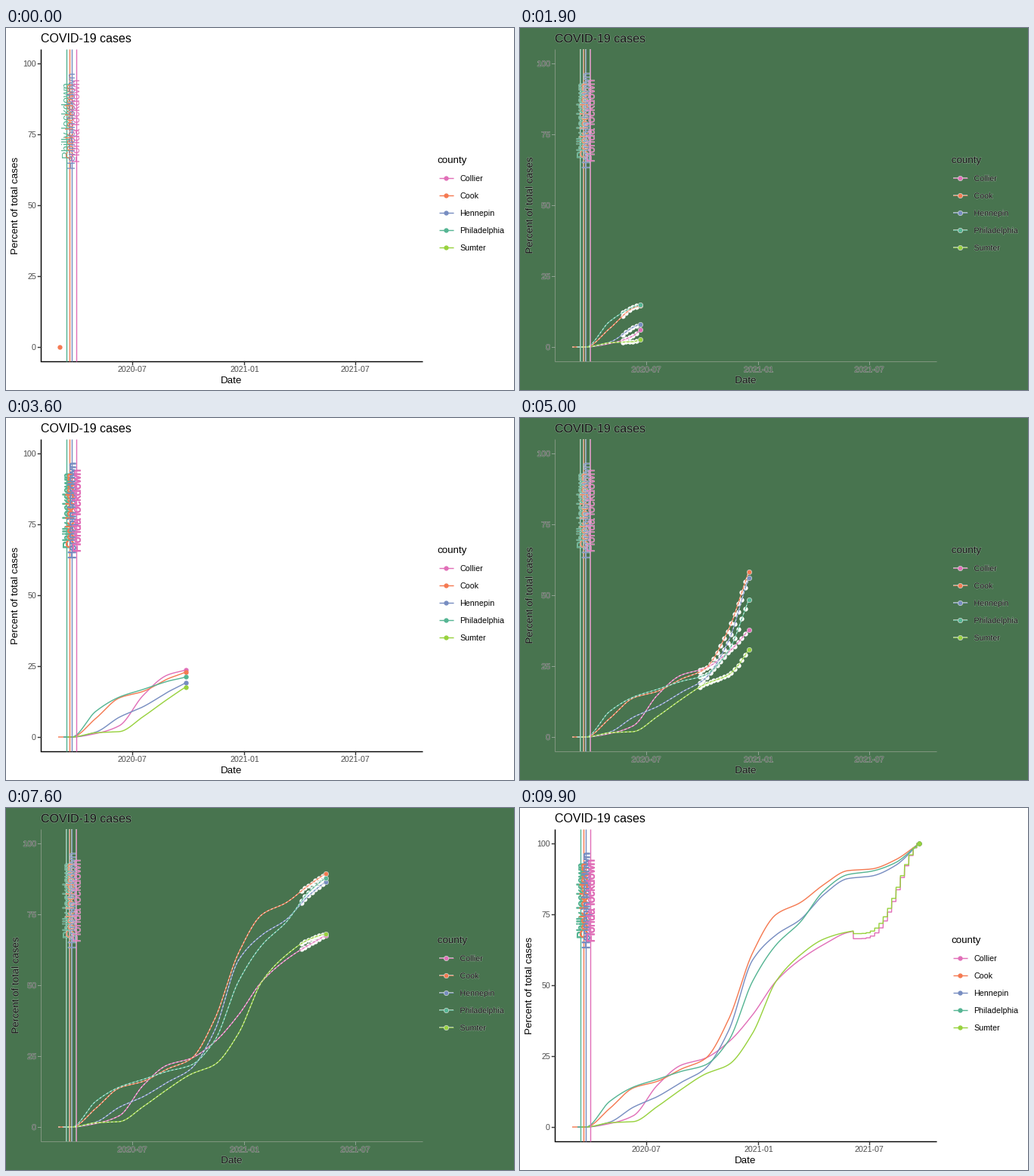
Write a matplotlib script that moves like this. It is 672 px wide and 480 px high and loops after 10 s.

```python
import numpy as np
import matplotlib.pyplot as plt
from matplotlib.animation import FuncAnimation
from matplotlib.patheffects import Normal, withStroke

W, H, DPI = 672, 480, 100
FRAMES, STEP = 100, 100
PT = 72 / DPI                      # points per pixel
WHITE, GREEN = "#ffffff", "#48744f"
PINK, ORANGE, BLUE, TEAL, LIME = "#e16fb8", "#f57a52", "#778dc1", "#55b593", "#98d23e"
LEFT, RIGHT, TOP, BOTTOM = 46, 551, 28, 442
HEAD, SPEED, END = 70.6, 4.64, 528
ONSET, SPACING = 87, 31.5          # first key point and distance to the next
WEEK, REVISION = 5.66, 440.8       # weekly reports begin with a correction

# name, colour, first x, percent at evenly spaced dates, percent after the correction
COUNTIES = [
    ("Collier", PINK, 80, [0, 1.2, 4, 14.7, 21.8, 24.2, 30, 39.5, 51.5, 59, 64.4, 68.6, 70], 66.4),
    ("Cook", ORANGE, 69, [0, 6.5, 13.8, 16.1, 20.4, 24, 38, 61.3, 75, 79.1, 85.5, 90.4, 91, 94.2, 100], None),
    ("Hennepin", BLUE, 76, [0, 1.7, 7, 10.7, 15.7, 20.5, 34, 58.8, 67.8, 73.1, 82, 87.6, 88.5, 92.2, 100], None),
    ("Philadelphia", TEAL, 76, [0, 9, 14.1, 16.8, 19.6, 21.8, 30.5, 51.3, 64.3, 72.2, 83.3, 89, 90.2, 93.2, 100], None),
    ("Sumter", LIME, 80, [0, 1.5, 1.9, 7.2, 13.2, 18.6, 22, 33, 51.5, 60.6, 66.3, 68.8, 70], 68.2),
]
LOCKDOWNS = [(80.3, "Philly", TEAL), (84.4, "Cook", ORANGE),
             (87, "Hennepin", BLUE), (93.3, "Florida", PINK)]
GREEN_SPANS = [(15, 20), (24, 33), (37, 95)]
TRAIL_STARTS = (14, 23, 36, 52, 60, 69, 82)

plt.rcParams["font.family"] = "Liberation Sans"
fig = plt.figure(figsize=(W / DPI, H / DPI), dpi=DPI)
ax = fig.add_axes([0, 0, 1, 1])


def y_px(pct):
    return 423 - 3.76 * np.asarray(pct)


def head_x(i):
    return np.minimum(HEAD + SPEED * i, END)


def monotone(x, keys):
    """Cubic through evenly spaced, rising key points without overshoot."""
    v = np.array(keys, float)
    rise = np.diff(v)
    inner = 2 * rise[:-1] * rise[1:] / (rise[:-1] + rise[1:])
    slope = np.concatenate([[0], inner, rise[-1:]])
    u = np.clip((x - ONSET) / SPACING, 0, len(rise))
    k = np.minimum(u.astype(int), len(rise) - 1)
    t = u - k
    return (v[k] + rise[k] * t * t * (3 - 2 * t)
            + slope[k] * t * (1 - t) ** 2 - slope[k + 1] * t * t * (1 - t))


def late_surge(x, base):
    """Eased climb to 100 percent, held for a week at a time."""
    held = REVISION + np.floor((x - REVISION) / WEEK) * WEEK
    at = np.where(x < END - 3, held, END)
    u = np.clip((at - REVISION) / (END - REVISION), 0, 1)
    return base + (100 - base) * (u * u * (3 - 2 * u)) ** 2


def build(first, keys, base):
    x = np.arange(first, END + .25, .25)
    pct = monotone(x, keys)
    if base is not None:
        pct = np.where(x > REVISION, late_surge(x, base), pct)
    return x, y_px(pct)


CURVES = [(color, *build(*shape)) for _, color, *shape in COUNTIES]


def line(x, y, color, ghost, z=2, speckled=False):
    width = 1.42 * PT
    style = dict(solid_capstyle="butt", dash_capstyle="butt")
    if ghost and not speckled:
        ax.plot(x, y, color=WHITE, alpha=.55, lw=2 * PT, zorder=z, **style)
        width = .8 * PT
    ax.plot(x, y, color=color, lw=width, zorder=z + .02, **style)
    if ghost and speckled:
        ax.plot(x, y, color=WHITE, alpha=.85, lw=.9 * PT, ls=(0, (3, 3)), zorder=z + .04, **style)


def dot(x, y, color, z=6, rim=False):
    ax.plot(x, y, "o", color=color, ms=6.3 * PT, ls="none", zorder=z,
            mec="#d5ddd6" if rim else color, mew=.7 * PT if rim else 0)


def text(x, y, s, px, ghost, color="black", ha="left", rot=0, z=4, bold=0):
    t = ax.text(x, y, s, size=px * PT, color=color, ha=ha, va="baseline",
                rotation=rot, rotation_mode="anchor", zorder=z)
    if ghost:
        t.set_alpha(.55)
        t.set_path_effects([withStroke(linewidth=.9 * PT, foreground=WHITE, alpha=.5), Normal()])
    elif bold > .05:
        t.set_path_effects([withStroke(linewidth=bold * PT, foreground=color), Normal()])


def draw_axes(ghost):
    ink = "#80957f" if ghost else "black"
    width = (1 if ghost else 1.42) * PT
    tick = dict(color="#8fa291" if ghost else "#333333", lw=width, zorder=1)
    ax.plot([LEFT, LEFT, RIGHT], [TOP, BOTTOM, BOTTOM], color=ink, lw=width, zorder=1,
            solid_capstyle="butt", solid_joinstyle="miter")
    for v in range(0, 101, 25):
        y = y_px(v)
        ax.plot([LEFT - 3.7, LEFT], [y, y], **tick)
        text(40, y + 3.8, str(v), 10.67, ghost, "#4d4d4d", "right")
    for x, s in ((166.7, "2020-07"), (315.4, "2021-01"), (461.7, "2021-07")):
        ax.plot([x, x], [BOTTOM, BOTTOM + 3.7], **tick)
        text(x, 456.3, s, 10.67, ghost, "#4d4d4d", "center")
    text(LEFT, 19, "COVID-19 cases", 16, ghost)
    text(298.5, 471, "Date", 13.33, ghost, ha="center")
    text(16.5, 235, "Percent of total cases", 13.33, ghost, ha="center", rot=90)


def draw_legend(ghost):
    text(570.8, 179, "county", 13.33, ghost)
    for k, (name, color, *_) in enumerate(COUNTIES):
        y = 199 + 23 * k
        line([573, 591.5], [y, y], color, ghost)
        dot(582.3, y, color, rim=ghost)
        text(600.5, y + 3.9, name, 10.67, ghost)


def draw_lockdowns(i, ghost):
    bold = .9 * (1 - np.exp(-i / 3))
    for k, (x, place, color) in enumerate(LOCKDOWNS):
        line([x, x], [TOP, BOTTOM], color, ghost, z=3)
        text(x + 5.2, 122.8, place + " lockdown", 14.67, ghost, color, "center", 90, 4 + k / 10, bold)


def draw_curves(i, ghost):
    head = head_x(i)
    since = max((k for k in TRAIL_STARTS if k <= i), default=0)
    trail = head_x(np.arange(since, i))
    for k, (color, x, y) in enumerate(CURVES):
        if head < x[0]:
            continue
        end_y = np.interp(head, x, y)
        seen = x < head
        if ghost:
            dot(trail, np.interp(trail, x, y), WHITE, 1.5)
        line(np.append(x[seen], head), np.append(y[seen], end_y), color, ghost, 2 + k / 10, True)
        dot(head, end_y, color, 6 + k / 10, ghost)


def update(i):
    ghost = any(a <= i < b for a, b in GREEN_SPANS)
    ax.clear()
    ax.set(xlim=(0, W), ylim=(H, 0))
    ax.set_axis_off()
    fig.set_facecolor(GREEN if ghost else WHITE)
    draw_axes(ghost)
    draw_legend(ghost)
    draw_lockdowns(i, ghost)
    draw_curves(i, ghost)
    return []


anim = FuncAnimation(fig, update, frames=FRAMES, interval=STEP, init_func=lambda: [],
                     repeat=True, repeat_delay=0, blit=False)
plt.show()
```
